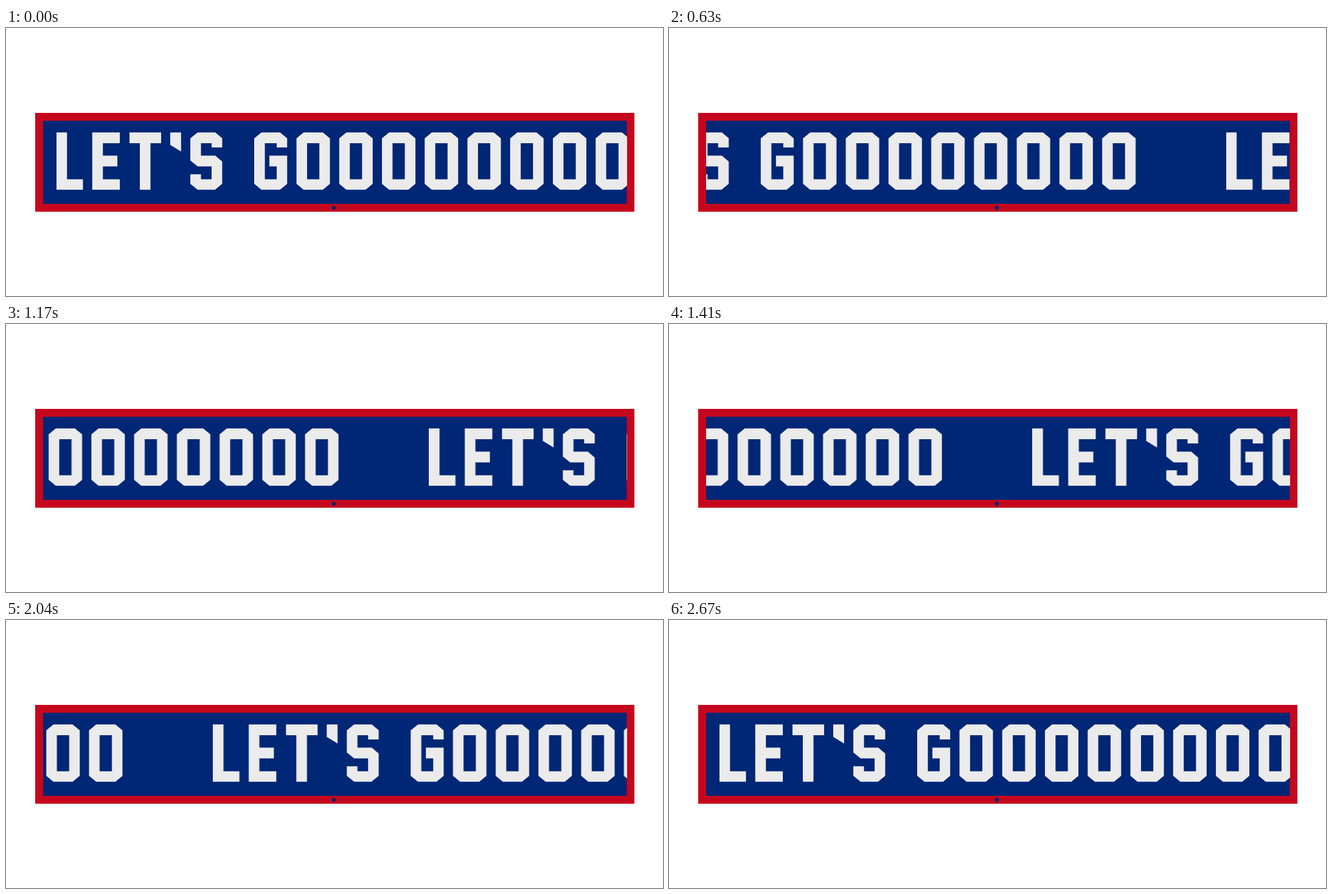
Write an HTML page that moves like this. It is 1080x442 px and loops after 2.7 s.

```html
<!DOCTYPE html>
<html lang="en">
<head>
<meta charset="utf-8">
<title>Scrolling banner</title>
<style>
  html, body { margin: 0; width: 100%; height: 100%; overflow: hidden; background: #fff; }
  svg { display: block; width: 100%; height: 100%; }
</style>
</head>
<body>
<svg viewBox="0 0 1080 442" role="img" aria-label="LET'S GOOOOOOOO">
  <defs>
    <clipPath id="window"><rect x="61" y="153" width="960" height="137"/></clipPath>
    <g id="phrase" fill="#ebebeb" fill-rule="evenodd"></g>
  </defs>
  <rect x="48" y="140" width="985" height="163" fill="#c4071d"/>
  <rect x="61" y="153" width="959.5" height="137" fill="#002676"/>
  <circle cx="539" cy="296.5" r="3.2" fill="#002676"/>
  <g clip-path="url(#window)">
    <g id="track">
      <use href="#phrase"/>
      <use href="#phrase" x="1090"/>
    </g>
  </g>
</svg>
<script>
  const PERIOD = 1090, STEPS = 90, STEP_MS = 30;
  const O_COUNT = 8, O_PITCH = 70.25;

  // Outlines relative to each letter's left edge; y runs from 0 to 94.5.
  const shapes = {
    L: 'M0 0H17.3V77.3H43.5V94.5H0Z',
    E: 'M0 0H45.3V17.7H17.5V38.2H41.3V56H17.5V77.3H45.3V94.5H0Z',
    T: 'M0 0H52V17.7H34.5V94.5H17V17.7H0Z',
    mark: 'M0 0H17.8V31.5L0 20.5Z',
    S: 'M12 0H41L52.4 9.5V24.7H35V17.7H17.5V38.2H41L52.4 48V84.7L40.5 94.5H12L0 84.7V69H17.5V77.3H35V56H12L0 46.2V9.8Z',
    G: 'M12 0H42.5L54.2 9.8V24.7H37V17.7H17.5V77.3H37V56H25V38.2H54.2V84.7L42.5 94.5H12L0 84.7V9.8Z',
    O: 'M11.7 0H43.3L55 9.8V84.7L43.3 94.5H11.7L0 84.7V9.8ZM17.4 17.7V77.3H37.6V17.7Z'
  };
  const letters = [['L', 83], ['E', 141.8], ['T', 203], ['mark', 270], ['S', 303], ['G', 408]];
  for (let i = 0; i < O_COUNT; i++) letters.push(['O', 477.5 + i * O_PITCH]);

  const phrase = document.getElementById('phrase');
  for (const [name, x] of letters) {
    const path = document.createElementNS('http://www.w3.org/2000/svg', 'path');
    path.setAttribute('d', shapes[name]);
    path.setAttribute('transform', `translate(${x} 172.3)`);
    phrase.append(path);
  }

  // The first and last steps show the same pose.
  document.getElementById('track').animate(
    [{ transform: 'translateX(0px)' }, { transform: `translateX(${-PERIOD}px)` }],
    { duration: STEPS * STEP_MS, iterations: Infinity, easing: `steps(${STEPS}, jump-none)` }
  );
</script>
</body>
</html>
```
